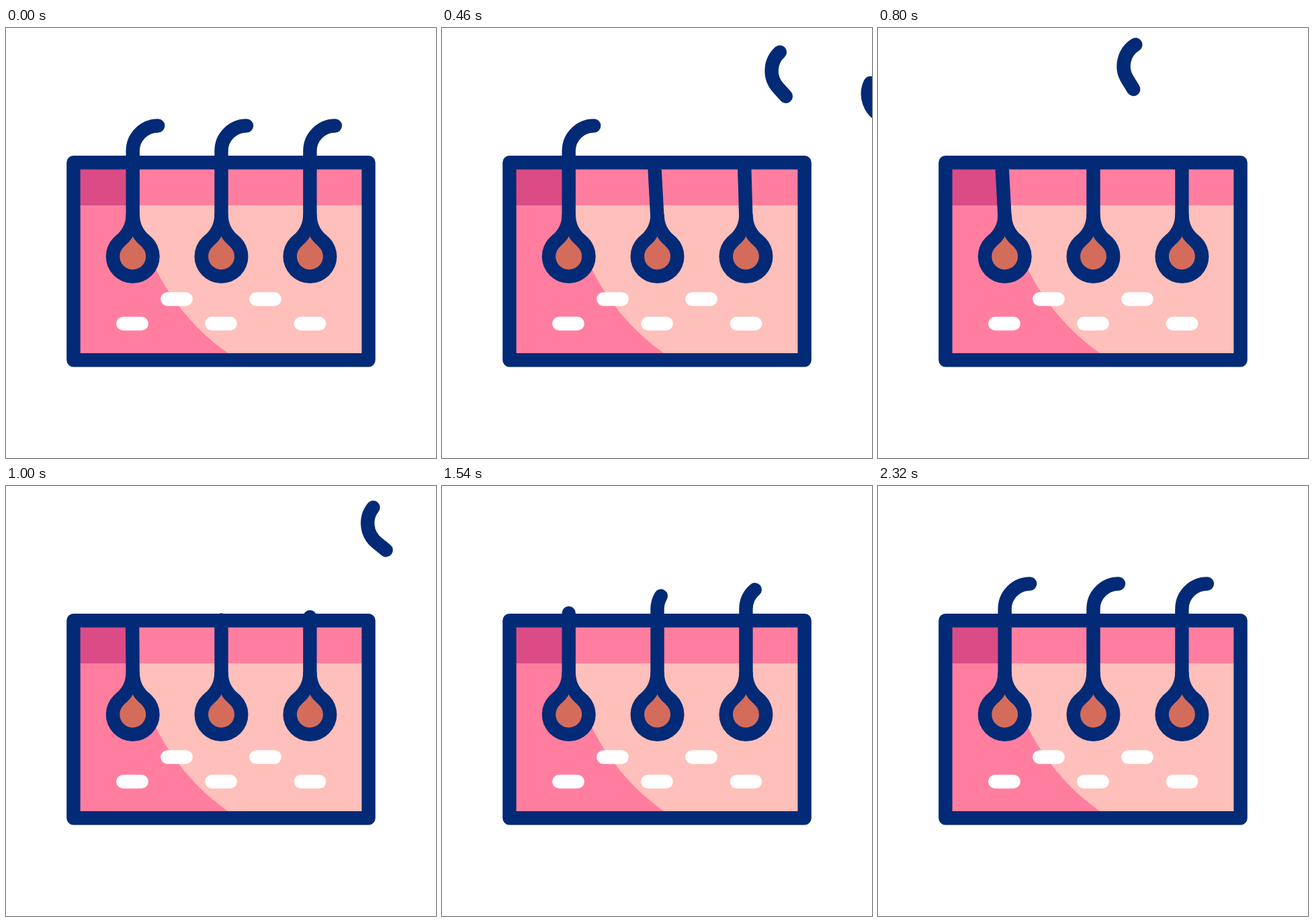
An HTML page with a canvas for the animation above (2400 ms loop, 640 px wide and 640 px high).

```html
<!DOCTYPE html>
<html lang="en">
<head>
<meta charset="utf-8">
<title>Hair follicles</title>
<style>
  html, body { margin: 0; width: 100%; height: 100%; overflow: hidden; background: #fff; }
  canvas { display: block; width: 640px; height: 640px; }
</style>
</head>
<body>
<canvas id="stage" width="640" height="640"></canvas>
<script>
const ctx = document.getElementById('stage').getContext('2d');
const LOOP = 2400;
const NAVY = '#032a76', PINK = '#ff7ea0', PLUM = '#db4b85', PEACH = '#ffbfba', CLAY = '#d46c5c';

const SKIN_Y = 200.3;      // where a hair leaves the skin
const BEND_Y = 183, BEND_R = 37.5;
const STEM = SKIN_Y - BEND_Y;
const HAIR_LENGTH = STEM + BEND_R * Math.PI / 2;
const MID_X = BEND_R / 2, MID_Y = 172.8;

// breakAt/flight and growAt/growth in ms; drift = linear and quadratic travel; lift scales the arc
const hairs = [
  { x: 188.7, breakAt: 476, flight: 790, drift: [260, 398], lift: 1, growAt: 1282, growth: 1045 },
  { x: 320.5, breakAt: 182, flight: 510, drift: [212, 174], lift: 0.87, growAt: 922, growth: 1250 },
  { x: 452.4, breakAt: 20, flight: 527, drift: [170, 58], lift: 0.91, growAt: 790, growth: 1250 }
];
const pills = [[254, 403.5], [386, 403.5], [188, 440], [320, 440], [452.5, 440]];

const clamp = v => Math.min(1, Math.max(0, v));
const easeSine = p => (1 - Math.cos(Math.PI * p)) / 2;

function box(color, x, y, w, h) {
  ctx.fillStyle = color;
  ctx.fillRect(x, y, w, h);
}

function drawSkin() {
  box(PEACH, 100, 200, 440, 294);
  ctx.save();
  ctx.beginPath();
  ctx.rect(100, 200, 440, 294);
  ctx.clip();
  ctx.fillStyle = PINK;
  ctx.beginPath();
  ctx.moveTo(100, 210);
  ctx.lineTo(188, 210);
  ctx.arc(523, 210, 335, Math.PI, Math.PI / 2, true);
  ctx.lineTo(100, 545);
  ctx.fill();
  ctx.restore();
  box(PINK, 100, 200, 440, 64);
  box(PLUM, 100, 200, 88.5, 64);

  ctx.strokeStyle = '#fff';
  ctx.beginPath();
  for (const [x, y] of pills) {
    ctx.moveTo(x - 13.7, y);
    ctx.lineTo(x + 13.7, y);
  }
  ctx.stroke();
  ctx.strokeStyle = NAVY;
  ctx.strokeRect(100.4, 200.3, 439.2, 294);
}

function drawBulb(x) {
  ctx.fillStyle = NAVY;
  ctx.beginPath();
  ctx.arc(x, 340, 40, 0, Math.PI * 2);
  ctx.fill();
  ctx.beginPath();
  ctx.moveTo(x - 10.2, 277);
  ctx.bezierCurveTo(x - 10.2, 291, x - 15.5, 301, x - 25, 309);
  ctx.lineTo(x + 25, 309);
  ctx.bezierCurveTo(x + 15.5, 301, x + 10.2, 291, x + 10.2, 277);
  ctx.fill();

  ctx.fillStyle = CLAY;
  ctx.beginPath();
  ctx.moveTo(x, 310);
  ctx.bezierCurveTo(x + 3, 317, x + 9, 321, x + 13, 325.5);
  ctx.arc(x, 340, 19.5, Math.atan2(-14.5, 13), Math.atan2(-14.5, -13));
  ctx.bezierCurveTo(x - 9, 321, x - 3, 317, x, 310);
  ctx.fill();
}

// Part of the hair above the skin, continuing the current path
function traceHair(x, length) {
  ctx.lineTo(x, SKIN_Y - Math.min(length, STEM));
  if (length > STEM) {
    const sweep = (length - STEM) / BEND_R;
    ctx.arc(x + BEND_R, BEND_Y, BEND_R, Math.PI, Math.PI + sweep);
  }
}

function drawRoot(hair, t) {
  const age = t - hair.breakAt;
  const lean = age > 0 && age < 600 ? -4.5 * Math.sin(Math.PI * age / 600) ** 2 : 0;
  const grown = age < 0 ? 1 : easeSine(clamp((t - hair.growAt) / hair.growth));
  ctx.beginPath();
  ctx.moveTo(hair.x, 284);
  ctx.lineTo(hair.x + lean, SKIN_Y);
  if (grown > 0) traceHair(hair.x, grown * HAIR_LENGTH);
  ctx.stroke();
}

function drawLooseHair(hair, t) {
  const u = (t - hair.breakAt) / hair.flight;
  if (u < 0 || u > 1) return;
  const v = 1 - u;
  const dx = u * (hair.drift[0] + hair.drift[1] * u);
  const dy = -hair.lift * 3 * u * v * (150 * v + 170 * u);
  ctx.save();
  ctx.translate(hair.x + MID_X + dx, MID_Y + dy);
  ctx.rotate(-77 * u * Math.PI / 180);
  ctx.translate(-MID_X, -MID_Y);
  ctx.beginPath();
  ctx.moveTo(0, SKIN_Y);
  traceHair(0, HAIR_LENGTH);
  ctx.stroke();
  ctx.restore();
}

function draw(t) {
  box('#fff', 0, 0, 640, 640);
  ctx.lineWidth = 20.4;
  ctx.lineCap = ctx.lineJoin = 'round';
  drawSkin();
  for (const hair of hairs) {
    drawRoot(hair, t);
    drawBulb(hair.x);
  }
  for (const hair of hairs) drawLooseHair(hair, t);
}

const start = performance.now();
function tick() {
  draw((performance.now() - start) % LOOP);
  requestAnimationFrame(tick);
}
tick();
</script>
</body>
</html>
```
